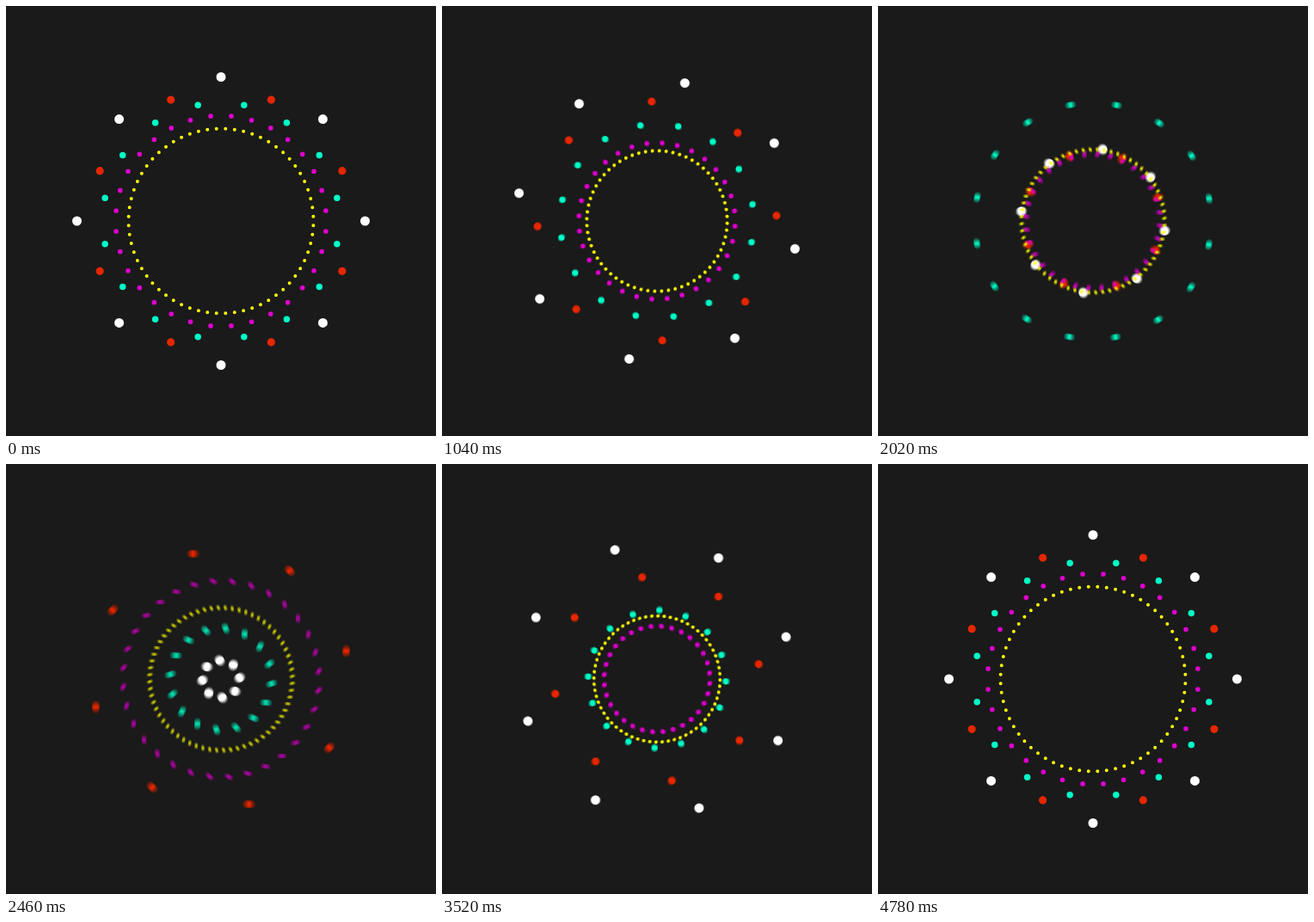
An HTML page with a canvas for the animation above (4800 ms loop, 500 by 500 pixels).

```html
<!DOCTYPE html>
<html lang="en">
<head>
<meta charset="utf-8">
<title>Orbiting rings</title>
<style>
  html, body { margin: 0; width: 100%; height: 100%; overflow: hidden; background: #1a1a1a; }
  canvas { display: block; width: 500px; height: 500px; }
</style>
</head>
<body>
<canvas id="stage" width="500" height="500"></canvas>
<script>
const SIZE = 500, LOOP = 4800, STEP = 20, FRAMES = LOOP / STEP;
const SAMPLES = 8, BACK = '#1a1a1a', TAU = Math.PI * 2;
const HUB = 90; // distance of every small orbit from the centre

// Each dot circles its hub `turns` times per loop.
const rings = [
  { count: 8,  shift: 0,  orbit: 77.5, turns: 1, radius: 5.5,  color: '#ffffff' },
  { count: 8,  shift: .5, orbit: 62.5, turns: 2, radius: 4.6,  color: '#e62600' },
  { count: 16, shift: .5, orbit: 47.5, turns: 3, radius: 3.75, color: '#00ffc8' },
  { count: 32, shift: .5, orbit: 32.5, turns: 4, radius: 2.85, color: '#dc00cd' },
  { count: 64, shift: .5, orbit: 17.5, turns: 5, radius: 2,    color: '#ffff00' }
];

const ctx = document.getElementById('stage').getContext('2d');
const layer = document.createElement('canvas');
layer.width = layer.height = SIZE;
const pen = layer.getContext('2d');

const ease = p => p < .5
  ? .5 * Math.pow(2 * p, 2.4)
  : 1 - .5 * Math.pow(2 * (1 - p), 2.4);

function drawRing(ring, progress) {
  const phase = TAU * ring.turns * progress;
  const x = HUB + ring.orbit * Math.cos(phase);
  const y = ring.orbit * Math.sin(phase);
  pen.fillStyle = ring.color;
  pen.beginPath();
  for (let i = 0; i < ring.count; i++) {
    const a = TAU * (i + ring.shift) / ring.count - Math.PI / 2;
    const cos = Math.cos(a), sin = Math.sin(a);
    const px = SIZE / 2 + x * cos - y * sin;
    const py = SIZE / 2 + x * sin + y * cos;
    pen.moveTo(px + ring.radius, py);
    pen.arc(px, py, ring.radius, 0, TAU);
  }
  pen.fill();
}

function drawScene(p) {
  pen.fillStyle = BACK;
  pen.fillRect(0, 0, SIZE, SIZE);
  const progress = ease(p);
  rings.forEach(ring => drawRing(ring, progress));
}

// Motion blur: running average of several moments within one step.
function render(time) {
  const index = Math.floor(time / STEP + 1e-6) % FRAMES;
  for (let s = 0; s < SAMPLES; s++) {
    drawScene((index + s / SAMPLES) / FRAMES);
    ctx.globalAlpha = 1 / (s + 1);
    ctx.drawImage(layer, 0, 0);
  }
}

function tick() {
  render(performance.now());
  requestAnimationFrame(tick);
}
tick();
</script>
</body>
</html>
```
